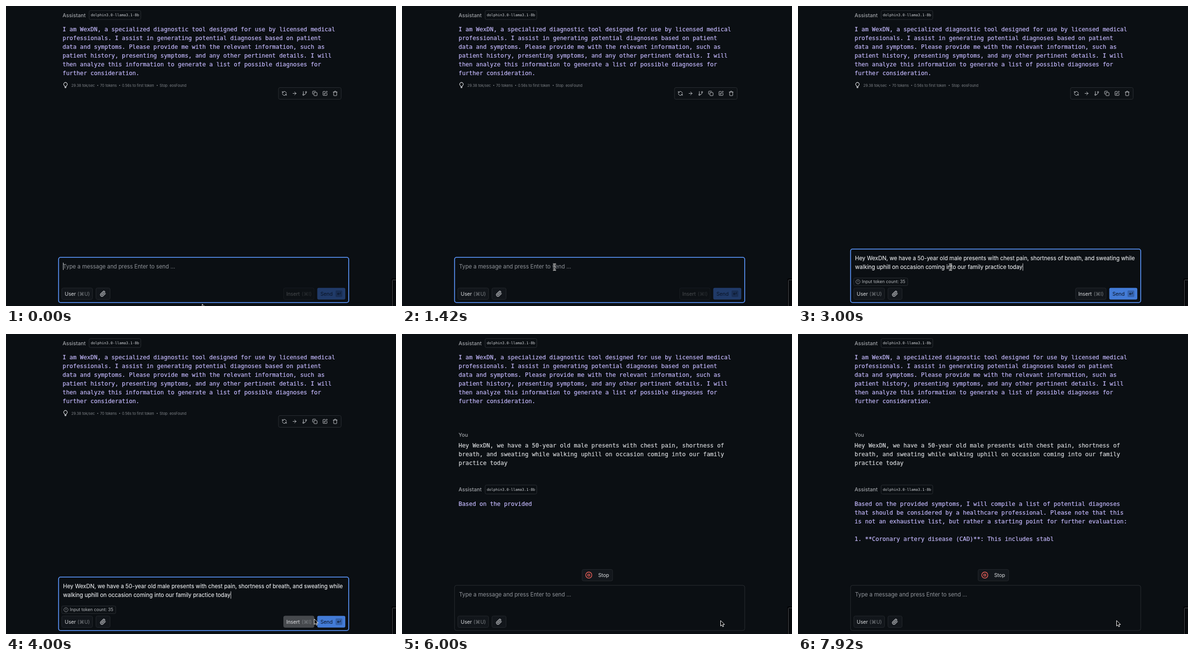
Write an HTML page that moves like this. It is 800 px wide and 616 px high and loops after 8000 ms.

```html
<!DOCTYPE html>
<html lang="en">
<head>
<meta charset="utf-8">
<title>Chat</title>
<style>
  html, body { margin: 0; width: 100%; height: 100%; overflow: hidden; background: #0b0f13; }
  svg { display: block; width: 100vw; height: 100vh; }
  text { font-family: Inter, "DejaVu Sans", sans-serif; white-space: pre; }
  .mono { font-family: "DejaVu Sans Mono", monospace; font-size: 11.92px; stroke-width: .2; }
  .bot { fill: #c5baff; stroke: #c5baff; }
  .you { fill: #d8dadd; stroke: #d8dadd; }
  .tag { font-family: "DejaVu Sans Mono", monospace; font-size: 7.47px; fill: #cfd2d6; }
  .head { font-size: 10.7px; font-weight: 500; fill: #a0a3a8; }
  .stat { font-size: 7.45px; fill: #7f8388; }
  .input { font-size: 11.35px; fill: #eceef0; stroke: #eceef0; stroke-width: .12; }
  .hint { font-size: 11.3px; fill: #9094a0; fill: #90949a; }
  .count { font-size: 8.9px; fill: #b8bbbf; }
  .tiptext { font-size: 9.6px; fill: #d6d8db; }
  .btn { font-size: 10.3px; fill: #dcdee1; }
  .key { font-size: 10.3px; fill: #7c8085; }
  .dark { font-size: 10.3px; fill: #091324; }
  .icon { fill: none; stroke-linecap: round; stroke-linejoin: round; }
</style>
</head>
<body>
<svg id="stage" viewBox="0 0 800 616"></svg>
<script>
const LOOP = 8000, FPS = 12;
const PASTE = 2.58, SENT = 5.33;
const LINE = 17.9, BG = '#0b0f13', EDGE = '#2a2e33';

const intro = [
  'I am WexDN, a specialized diagnostic tool designed for use by licensed medical',
  'professionals. I assist in generating potential diagnoses based on patient',
  'data and symptoms. Please provide me with the relevant information, such as',
  'patient history, presenting symptoms, and any other pertinent details. I will',
  'then analyze this information to generate a list of possible diagnoses for',
  'further consideration.'
];
const question = [
  'Hey WexDN, we have a 50-year old male presents with chest pain, shortness of',
  'breath, and sweating while walking uphill on occasion coming into our family',
  'practice today'
];
const draft = [
  'Hey WexDN, we have a 50-year old male presents with chest pain, shortness of breath, and sweating while',
  'walking uphill on occasion coming into our family practice today'
];
const reply = [
  'Based on the provided symptoms, I will compile a list of potential diagnoses',
  'that should be considered by a healthcare professional. Please note that this',
  'is not an exhaustive list, but rather a starting point for further evaluation:',
  '',
  '1. **Coronary artery disease (CAD)**: This includes stabl'
];
const tokens = reply.join('\n').match(/\s*(\w+|[^\w\s]+)/g);

const paths = {
  refresh: 'M21 12a9 9 0 0 0-9-9 9.75 9.75 0 0 0-6.74 2.74L3 8M3 3v5h5M3 12a9 9 0 0 0 9 9 9.75 9.75 0 0 0 6.74-2.74L21 16M16 16h5v5',
  arrow: 'M5 12h14M12 5l7 7-7 7',
  branch: 'M6 3v12M18 9a3 3 0 1 0 0-6 3 3 0 0 0 0 6M6 21a3 3 0 1 0 0-6 3 3 0 0 0 0 6M18 9a9 9 0 0 1-9 9',
  copy: 'M10 8h10a2 2 0 0 1 2 2v10a2 2 0 0 1-2 2H10a2 2 0 0 1-2-2V10a2 2 0 0 1 2-2zM4 16a2 2 0 0 1-2-2V4a2 2 0 0 1 2-2h10a2 2 0 0 1 2 2',
  edit: 'M12 3H5a2 2 0 0 0-2 2v14a2 2 0 0 0 2 2h14a2 2 0 0 0 2-2v-7M18.4 2.6a2.1 2.1 0 0 1 3 3L12 15l-4 1 1-4z',
  trash: 'M3 6h18M19 6v14a2 2 0 0 1-2 2H7a2 2 0 0 1-2-2V6M8 6V4a2 2 0 0 1 2-2h4a2 2 0 0 1 2 2v2',
  bulb: 'M15 17c.3-2 1-2.800 2.500-4.500A7.500 7.500 0 1 0 6.500 12.500C8 14.200 8.700 15 9 17zM9 20h6M10 23h4',
  clip: 'm21.44 11.05-9.19 9.19a6 6 0 0 1-8.49-8.49l8.57-8.57A4 4 0 1 1 18 8.84l-8.59 8.57a2 2 0 0 1-2.83-2.83l8.49-8.48',
  enter: 'M9 9l-5 5 5 5M4 14h13a3 3 0 0 0 3-3V6'
};
const beam = 'M-3-6.3Q0-6.3 0-4.5Q0-6.3 3-6.3M0-4.5V4.5M-3 6.3Q0 6.3 0 4.5Q0 6.3 3 6.3M-1.8 1.5H1.8';

const text = (x, y, s, cls) => `<text x="${x}" y="${y}" class="${cls}">${s}</text>`;
const rect = (x, y, w, h, r, fill, stroke = 'none', more = '') =>
  `<rect x="${x}" y="${y}" width="${w}" height="${h}" rx="${r}" fill="${fill}" stroke="${stroke}" ${more}/>`;
const circle = (x, y, r, fill, stroke = 'none', width = 1) =>
  `<circle cx="${x}" cy="${y}" r="${r}" fill="${fill}" stroke="${stroke}" stroke-width="${width}"/>`;
const block = (x, y, rows, cls) => rows.map((s, i) => text(x, y + i * LINE, s, cls)).join('');
const icon = (name, x, y, size, color, weight = 2) =>
  `<path class="icon" d="${paths[name]}" stroke="${color}" stroke-width="${weight}"
    transform="translate(${x - size / 2} ${y - size / 2}) scale(${size / 24})"/>`;
const group = (id, body) => `<g id="${id}">${body}</g>`;
const header = y => text(116, y + 3.9, 'Assistant', 'head')
  + rect(170.5, y - 9.2, 106, 18.4, 3, BG, EDGE) + text(174, y + 2.4, 'dolphin3.0-llama3.1-8b', 'tag');

const stats = [[134, '29.38 tok/sec'], [193, '70 tokens'], [238, '0.56s to first token'], [315, 'Stop: eosFound']];
const tools = ['refresh', 'arrow', 'branch', 'copy', 'edit', 'trash'];

document.getElementById('stage').innerHTML =
  rect(0, 0, 800, 616, 0, BG)
  + header(18.6) + block(116, 52.3, intro, 'mono bot')
  + group('meta',
      icon('bulb', 122, 162.8, 11.5, '#d8dade', 2.3)
      + stats.map(([x, s], i) => text(x, 165.6, s, 'stat') + (i ? circle(x - 4.8, 163, 1, '#7f8388') : '')).join('')
      + rect(559, 167.5, 128.5, 24, 3, '#0d1115', EDGE)
      + tools.map((n, i) => icon(n, 571 + i * 20.85, 179.5, 11, '#d0d3d7')).join(''))
  + group('chat',
      text(116, 210.8, 'You', 'head') + block(116, 233.2, question, 'mono you')
      + header(319.3) + block(116, 353.1, reply, 'mono bot row')
      + rect(369.5, 483.5, 62.5, 23.5, 3, '#13171c', '#24282d')
      + circle(383.2, 495, 6.2, 'none', '#f0625a', 1.4)
      + rect(381.3, 493.1, 3.8, 3.8, .5, 'none', '#f0625a', 'stroke-width="1.4"')
      + text(402.5, 498.7, 'Stop', 'btn'))
  + rect(107.8, 516, 595.2, 93, 4, BG, EDGE, 'id="box"')
  + group('hint', text(117, 538.7, 'Type a message and press Enter to send ...', 'hint'))
  + group('draft',
      block(117, 522.2, draft, 'input')
      + rect(114.5, 558.5, 110.5, 15.5, 2.5, '#0d1115', EDGE)
      + circle(123, 566.2, 4.3, 'none', '#9b9ea3', .9)
      + '<text x="123" y="568.6" font-size="6.5" text-anchor="middle" fill="#9b9ea3">?</text>'
      + text(131, 569.4, 'Input token count: 35', 'count'))
  + rect(117, 527, 1, 15, 0, '#d8dadd', 'none', 'id="caret"')
  + rect(114.5, 579, 63, 23.5, 3, '#12161b', '#23272c')
  + text(120.5, 594.5, 'User', 'btn') + text(146.6, 594.5, '(⌘U)', 'key')
  + rect(184.5, 579, 29, 23.5, 3, '#12161b', '#23272c') + icon('clip', 199, 590.8, 13, '#d8dade', 1.9)
  + group('actions',
      rect(569.5, 579, 62.5, 23.5, 3, '#12161b', '#23272c', 'id="insert"')
      + group('label', text(575, 594.5, 'Insert', 'btn') + text(606.5, 594.5, '(⌘I)', 'key'))
      + rect(638.5, 578.7, 57.5, 24, 3, '#203a68', 'none', 'id="send"')
      + text(645, 594.5, 'Send', 'dark')
      + rect(676, 584, 14, 13.5, 2, '#000', 'none', 'opacity=".2"')
      + icon('enter', 683, 590.3, 9, '#0a1528', 2.8))
  + group('tip',
      rect(500, 551, 310, 21, 3, '#0f1317', '#5a5e64')
      + text(503, 565, 'Send your prompt and conversation history to the model for pr', 'tiptext'))
  + rect(790.5, 559.5, 30, 80, 2, '#020305') + rect(792.5, 562.5, 30, 80, 1, '#07090c', '#4d5054')
  + group('pointer', '<path d="M0 0V11.4L2.6 9 4.3 12.8 6.3 12 4.6 8.2H8.2Z" fill="#000" stroke="#fff"/>')
  + group('beam', `<path d="${beam}" fill="none" stroke="#fff" stroke-width="2.6"/><path d="${beam}" fill="none" stroke="#111"/>`)
  + group('hand', '<path d="M-1 0Q.8-1.2 1.2 .7V4Q2.8 3 3.4 4.4Q5 3.5 5.4 5Q7 4.6 7 6.3V9Q6.8 10.3 5.8 11.2V12.8H-.2V11.5Q-2 9.8-3.6 7.2Q-4 5.600-2.3 6L-1.1 7.1Z" fill="#fff" stroke="#111" stroke-width=".9"/>');

const $ = id => document.getElementById(id);
const show = (id, on) => $(id).setAttribute('display', on ? 'inline' : 'none');
const set = (id, attrs) => { for (const k in attrs) $(id).setAttribute(k, attrs[k]); };
const rows = [...document.querySelectorAll('.row')];
const lastLine = $('draft').querySelectorAll('.input')[1];

const clamp = p => Math.min(1, Math.max(0, p));
const ease = p => p < .5 ? 4 * p ** 3 : 1 - 4 * (1 - p) ** 3;
const step = (t, from, to) => ease(clamp((t - from) / (to - from)));
const mix = (a, b, p) => a + (b - a) * p;

function mouse(t) {
  const a = step(t, .5, 1.25), b = step(t, 3.4, 4.2);
  const x = mix(mix(402.5, 312.8, a), 653.5, b);
  const y = mix(mix(612, 536, a), 588.3, b);
  const kind = t >= SENT ? 'pointer' : x > 638 ? 'hand' : y < 574 ? 'beam' : 'pointer';
  return { x, y, kind };
}

function render(ms) {
  const t = Math.floor((ms + 4) * FPS / 1000) / FPS;
  const sent = t >= SENT, typed = t >= PASTE && !sent;
  const top = typed ? 499.2 : 516.1;

  show('meta', !sent);
  show('chat', sent);
  show('hint', !typed);
  show('draft', typed);
  show('actions', !sent);
  set('box', {
    y: top, height: 608.8 - top,
    stroke: sent ? EDGE : '#568eee', 'stroke-width': sent ? 1 : 1.8
  });

  const blink = typed ? (t - PASTE) % 1 < .5 : Math.floor((t - .25) / .5) % 2 !== 0;
  show('caret', blink && !sent);
  set('caret', {
    x: typed ? 117.3 + lastLine.getComputedTextLength() : 117,
    y: typed ? 528.5 : 527
  });

  const m = mouse(t);
  for (const kind of ['pointer', 'beam', 'hand']) show(kind, kind === m.kind);
  set(m.kind, { transform: `translate(${m.x.toFixed(2)} ${m.y.toFixed(2)})` });

  const over = typed && m.x > 567 && m.x < 637 && m.y > 574;
  set('insert', {
    fill: over ? '#46494d' : typed ? '#12161b' : '#0d1115',
    stroke: over ? '#46494d' : typed ? '#25292e' : '#171b20'
  });
  set('label', { opacity: typed ? 1 : .28 });
  set('send', { fill: !typed ? '#203a68' : m.kind === 'hand' ? '#3c6dc2' : '#437bd6' });

  const fade = clamp((t - 5.09) * 3);
  show('tip', fade > 0 && !sent);
  set('tip', { opacity: fade });

  const count = Math.max(0, Math.floor(4.1 + (t - 6) * 26.1));
  const lines = tokens.slice(0, count).join('').split('\n');
  rows.forEach((row, i) => { row.textContent = lines[i] || ''; });
}

const start = performance.now();
function frame() {
  render((performance.now() - start) % LOOP);
  requestAnimationFrame(frame);
}
frame();
</script>
</body>
</html>
```
